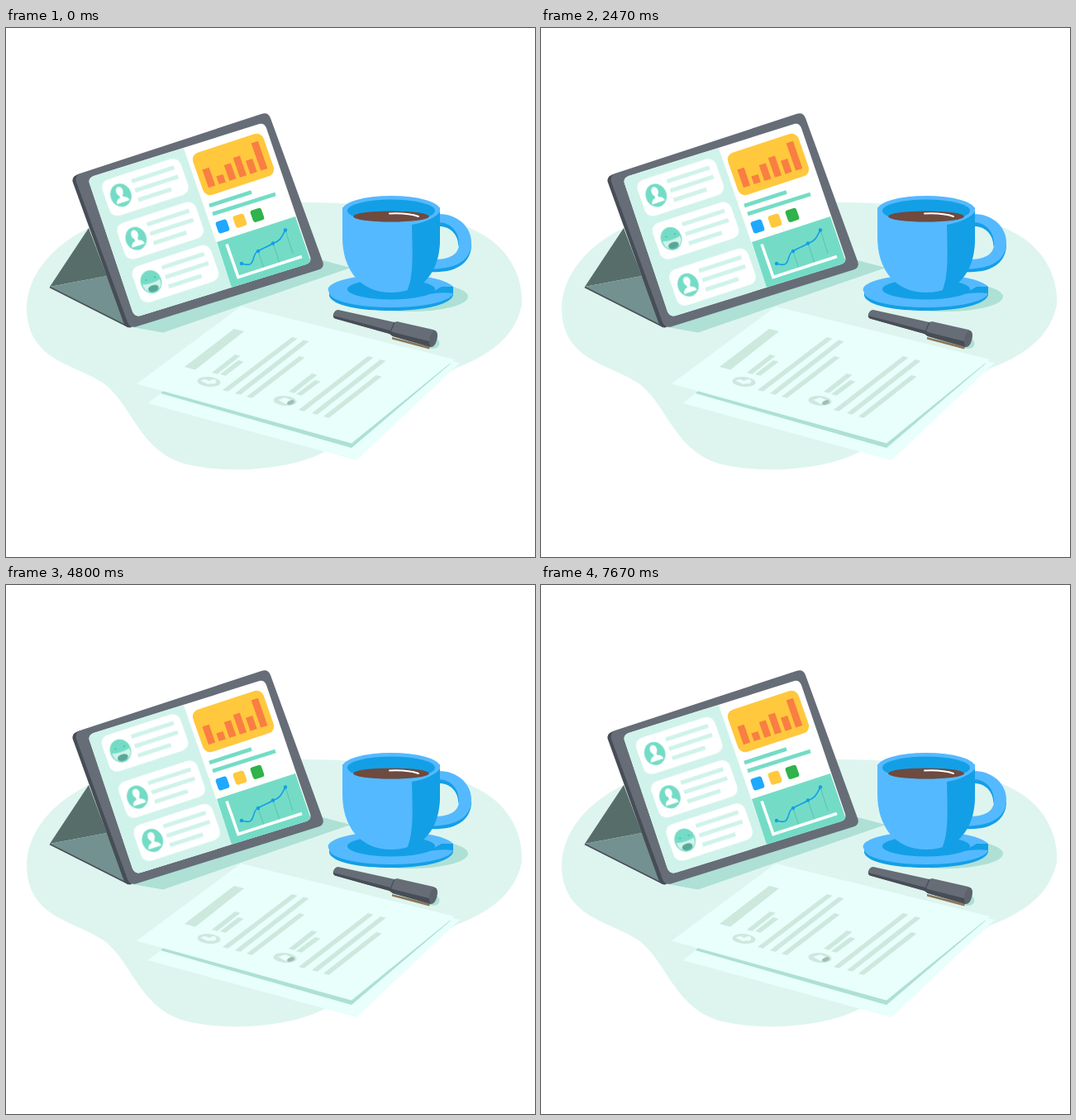
An HTML page for the animation above (8 s loop, 640 px wide and 640 px high).

```html
<!DOCTYPE html>
<html lang="en">
<head>
<meta charset="utf-8">
<title>Desk with tablet</title>
<style>
  html, body { margin: 0; width: 100%; height: 100%; overflow: hidden; background: #fff; }
  svg { display: block; width: 100vw; height: 100vh; }
</style>
</head>
<body>
<svg viewBox="0 0 640 640">
  <defs>
    <clipPath id="feed">
      <path d="M106 179L215 145.500L273 313L163 348Q156 350 153 343L101 188Q99 182 106 179Z"/>
    </clipPath>
    <clipPath id="screen">
      <path d="M106 179L305 116.500Q312 114 315 121L368 277Q370 284 363 286L163 348Q156 350 153 343L101 188Q99 182 106 179Z"/>
    </clipPath>
    <clipPath id="disc"><ellipse rx="12.600" ry="14.200"/></clipPath>
    <g id="card">
      <rect x="-50" y="-23" width="100" height="46" rx="10" fill="#fff"/>
      <path d="M-13-12H41M-13 0H42M-13 12H29" stroke="#cff3ea" stroke-width="5"/>
      <ellipse cx="-31" rx="12.600" ry="14.200" fill="#74dcc6"/>
    </g>
    <g id="person">
      <use href="#card"/>
      <g transform="translate(-31 0)" fill="#fff">
        <ellipse cy="-5" rx="4.200" ry="5.600"/>
        <path d="M-2-1H2V2.500Q8 4 8 9H-8Q-8 4-2 2.500Z"/>
      </g>
    </g>
    <g id="smiley">
      <use href="#card"/>
      <g transform="translate(-31 0)" clip-path="url(#disc)">
        <path d="M-11 0Q0 3 11 0Q12 8 6 11H-6Q-11 8-11 0Z" fill="#cff3ea"/>
        <ellipse cy="8.500" rx="6.500" ry="4" fill="#58a797"/>
        <circle cx="-5" cy="-4" r=".9" fill="#58a797"/>
        <circle cx="6" cy="-4" r=".9" fill="#58a797"/>
      </g>
    </g>
  </defs>

  <path fill="#def5ef" d="M25 340C25 298 58 262 100 242C180 214 300 207 362 211C440 211 530 222 577 250C612 271 626 305 624 335C616 376 580 398 545 411L385 513C345 534 270 541 215 527C167 512 155 468 130 441C103 407 26 412 25 340Z"/>

  <!-- tablet -->
  <path fill="#aee0d6" d="M148 361L190 368.500L417 290L383 281Z"/>
  <path fill="#566d6a" d="M100 242L53 313L122 300Z"/>
  <path fill="#739190" d="M53 313L122 300L148 361Z"/>
  <path d="M53 313.500L148 361.500" stroke="#474d56" stroke-width="1.800"/>
  <path fill="#474d56" d="M90 176Q78 179 81 187L142 356Q145 364 152 362Z"/>
  <path fill="#666d77" d="M91 175.500L309 104Q317 101 320 109L383 282Q386 290 378 292.500L157 361.500Q150 363 147 356L85 186Q83 178 91 175.500Z"/>
  <g clip-path="url(#screen)">
    <path fill="#fff" d="M90 100H390V360H90Z"/>
    <path fill="#cff3ea" d="M215 145.500L273 313L150 360L80 180Z"/>
    <path fill="#74dcc6" d="M255 259L350 228L372 292L273 314Z"/>
  </g>
  <g clip-path="url(#feed)"><g id="list"><g id="cards" transform="matrix(.95 -.31 .33 .945 0 0)"></g></g></g>
  <g id="chart" transform="matrix(.95 -.31 .33 .945 275 165)">
    <rect x="-45" y="-27" width="90" height="54" rx="9" fill="#ffc83d"/>
  </g>
  <path d="M246 215L297 198.500M250 225L326 201" stroke="#74dcc6" stroke-width="4.800"/>
  <g id="tiles"></g>
  <g fill="none">
    <path d="M305 270L312.500 292M323 260.500L331.500 286M338 244.500L347 273" stroke="#5cc0af"/>
    <path d="M267 261.500L281 301.500L358 276.500" stroke="#fff" stroke-width="3.600"/>
    <path d="M285 285C295 288 297 286 299 280C301 273 303 270 305 270C312 265 315 266 323 260.500C332 258 334 252 338 244.500" stroke="#139fe6" stroke-width="1.600"/>
  </g>
  <g id="dots" fill="#139fe6"></g>

  <!-- cup -->
  <ellipse cx="489" cy="325" rx="70" ry="18" fill="#aee0d6"/>
  <path fill="#139fe6" d="M391 320V324C395 336 428 342 466 342C504 342 538 335 541 323V314Z"/>
  <path fill="#55b9ff" d="M391 320A75 18 0 0 1 541 313V320A75 18 0 0 1 391 320Z"/>
  <path fill="#139fe6" d="M511 322L527 313H541V321Q528 319 511 322Z"/>
  <ellipse cx="466" cy="316" rx="53" ry="12.500" fill="#139fe6"/>
  <path fill="#139fe6" d="M513 282V295C545 297 563 284 563 262H550Q546 282 513 282Z"/>
  <path fill="#139fe6" d="M524 233C541 233 551 246 549 262L547.500 264C547 250 538 240 524 240Z"/>
  <path fill="#55b9ff" d="M522 225C545 224 563 240 563 259C563 281 545 292 512 291.500V280C535 281 548 275 548 261C548 246 538 235 522 235Z"/>
  <path fill="#55b9ff" d="M407 217V253C407 292 428 320 466 320C504 320 525 292 525 253V217Z"/>
  <path fill="#139fe6" d="M491 238Q517 233 525 222V256C525 292 507 313 485 319C493 300 492 278 491 238Z"/>
  <ellipse cx="466" cy="220" rx="59" ry="17" fill="#55b9ff"/>
  <ellipse cx="466" cy="221" rx="53" ry="13.500" fill="#139fe6"/>
  <ellipse cx="466" cy="228" rx="46" ry="6.600" fill="#6f4a3e"/>
  <path d="M464 224.500Q486 223.500 499 228" fill="none" stroke="#fff" stroke-width="2" stroke-linecap="round"/>

  <!-- papers -->
  <path fill="#e8fffc" d="M296 354L549 405L424 523L172 454Z"/>
  <path fill="#aee0d3" d="M284 342L538 406L418 508L187 442Z"/>
  <path fill="#e8fffc" d="M284 337L543 401L418 502.500L158 430.500Z"/>
  <path fill="#cde8dd" d="M276 364L288 367L229 413.500L216 410Z"/>
  <g id="text" fill="#cde8dd"></g>
  <g transform="translate(245.500 428)">
    <ellipse rx="14" ry="6" fill="#cde8dd" transform="rotate(5)"/>
    <path d="M-10-1Q-5-5 0-1Q7-5 9-1Q8 4 3 2Q-2 4-5 1Z" fill="#e8fffc"/>
  </g>
  <g transform="translate(337.500 451)">
    <ellipse rx="14" ry="6" fill="#cde8dd" transform="rotate(5)"/>
    <path d="M-8-1L0-4L7-1L1 4Z" fill="#e8fffc"/>
    <ellipse cx="7" cy="2" rx="4.500" ry="2.500" fill="#9fbfb4" transform="rotate(-20 7 2)"/>
  </g>

  <!-- pen -->
  <path fill="#aee0d6" d="M470 374L515 388Q526 388 524 379L519 374Z"/>
  <path fill="#8c7556" d="M467 374L513 385.500L512 388.500L467 376.500Z"/>
  <path fill="#666d77" d="M402 341L470 356L473 355L517 365Q523 367 521.500 374Q519 385 514 386L468 373L464 370L398 351.500Q395 350 396 346Q398 341 402 341Z"/>
  <path fill="#474d56" d="M396 348L465 366L468 368L512 379L514 386L468 373L464 370L398 351.500Q395.500 350 396 348Z"/>
  <ellipse cx="517" cy="376" rx="4.500" ry="10" fill="#5c636d" transform="rotate(14 517 376)"/>
  <path d="M470 356L464 370" stroke="#474d56" stroke-width="1.200"/>
</svg>

<script>
const NS = 'http://www.w3.org/2000/svg';
const $ = id => document.getElementById(id);
const add = (parent, tag, attrs) => {
  const el = document.createElementNS(NS, tag);
  for (const k in attrs) el.setAttribute(k, attrs[k]);
  parent.append(el);
};

// card offsets along the list, measured from the smiley card
[-110.8, -55.4, 0, 59.6, 115].forEach((y, i) => add($('cards'), 'use', {
  href: i === 2 ? '#smiley' : '#person',
  transform: `translate(${i > 2 ? 0.8 : 0} ${y})`
}));

[23, 10, 20, 25, 17, 35].forEach((h, i) => add($('chart'), 'rect', {
  x: 13.3 * i - 37.6, y: 17.5 - h, width: 8.6, height: h, fill: '#f97e43'
}));

['#1fa8ff', '#ffc83d', '#2fb34a'].forEach((fill, i) => add($('tiles'), 'rect', {
  x: -7, y: -7.5, width: 14, height: 15, rx: 3, fill,
  transform: `matrix(.95 -.31 .33 .945 ${262 + 21 * i} ${240 - 6.8 * i})`
}));

[[285, 285], [305, 270], [323, 260.5], [338, 244.5]].forEach(([cx, cy]) =>
  add($('dots'), 'circle', { cx, cy, r: 2.2 }));

// slanted text strokes: top end, then bottom end
[
  [346, 374, 262, 438], [360, 377.5, 277, 442], [355, 397, 291, 446],
  [277, 395, 249, 417], [281, 402, 259, 419],
  [438, 397, 354, 462], [453, 401, 370, 466], [448, 420, 384, 470],
  [370, 418, 342, 440], [374, 426, 351, 443]
].forEach(([x, y, u, v]) => add($('text'), 'path', {
  d: `M${x} ${y}l6.500 1.800L${u + 6.5} ${v + 1.8}L${u} ${v}Z`
}));

// time in ms, list position, easing towards the next step
const LOOP = 8000;
const steps = [
  [0, 205, 297.4, 'cubic-bezier(.25,.1,.33,1)'],
  [1700, 187.2, 245.8, 'ease-out'],
  [3500, 186.9, 244.8, 'ease-in-out'],
  [4335, 187.7, 247.9, 'cubic-bezier(.3,.55,.6,1)'],
  [4800, 168, 191, 'linear'],
  [6730, 168, 191, 'cubic-bezier(.3,.1,.7,.8)'],
  [7670, 203.7, 299, 'linear'],
  [LOOP, 203.7, 299, 'linear']
];
$('list').animate(
  steps.map(([t, x, y, easing]) => ({ offset: t / LOOP, transform: `translate(${x}px, ${y}px)`, easing })),
  { duration: LOOP, iterations: Infinity }
);
</script>
</body>
</html>
```
